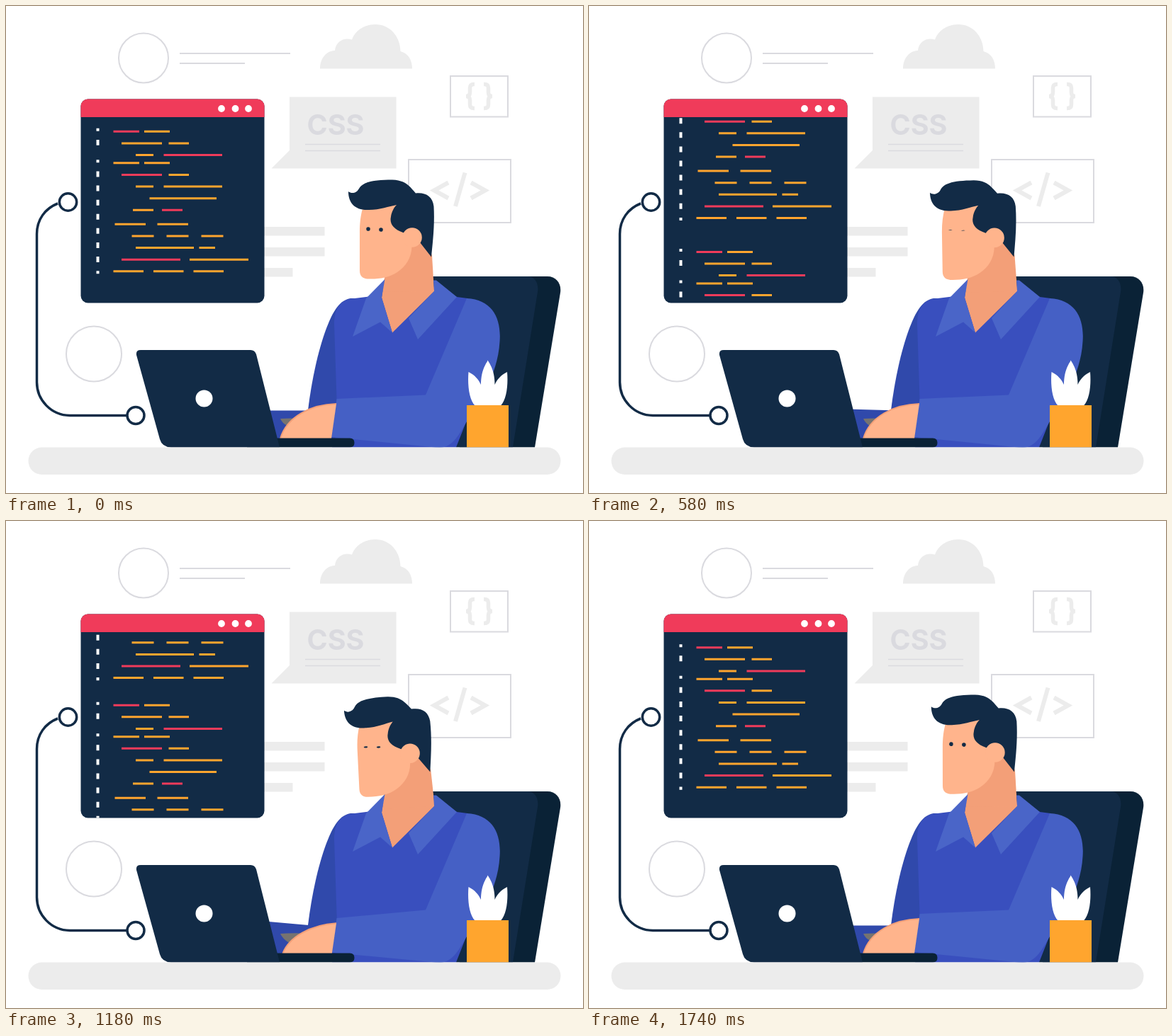
These frames come from a looping animation (814x688 px, 1.76 s). An HTML page:

```html
<!DOCTYPE html>
<html lang="en">
<head>
<meta charset="utf-8">
<title>Developer at work</title>
<style>
html, body { margin: 0; width: 100%; height: 100%; overflow: hidden; background: #fff; }
svg { display: block; }
.navy { fill: #122b46; }
.deep { fill: #0a2236; }
.pale { fill: #ececec; }
.skin { fill: #ffb48c; }
.shade { fill: #f39f78; }
.sleeve { fill: #4560c5; }
.collar { fill: #4a65c8; }
.far { fill: #3049ab; }
.thin { fill: none; stroke: #dadadf; stroke-width: 2; }
.glyph { fill: none; stroke: #ececec; stroke-width: 6; }
.cable { fill: none; stroke: #122b46; stroke-width: 3.5; }
</style>
</head>
<body>
<svg width="814" height="688" viewBox="0 0 814 688">
  <defs>
    <clipPath id="screen"><rect x="105.5" y="157" width="259" height="262.5"/></clipPath>
    <clipPath id="bar"><rect x="105" y="131" width="260" height="26"/></clipPath>
  </defs>

  <!-- backdrop -->
  <g class="thin">
    <circle cx="194" cy="73.5" r="35"/>
    <circle cx="124" cy="491.5" r="39"/>
    <path d="M245 67H401M245 81H337"/>
    <rect x="627" y="99" width="81" height="57.5"/>
    <rect x="568" y="217" width="144" height="89"/>
  </g>
  <path class="pale" d="M443 88.500C443 73 453 63 464 63C465 50 477 44 488 47.500C493 34 506 26 521 26C541 26 556 42 556.500 64C568 67 573 77 573 88.500Z"/>
  <path class="pale" d="M400 128.500H550.500V229.500H374.500L400 204Z"/>
  <text x="424.500" y="182" font-family="Inter, sans-serif" font-weight="700" font-size="39.500" fill="#dadadf">CSS</text>
  <path class="thin" style="stroke-width:1.5" d="M422 195.500H528M422 204.500H528"/>
  <path class="pale" d="M360 312H449.500V324.500H360ZM360 341H449.500V353.500H360ZM360 370H404.500V382.500H360Z"/>
  <g class="glyph">
    <path id="brace" stroke-width="5.500" d="M661 110.500H660Q654.500 110.500 654.500 116V122Q654.500 127.500 649 127.500Q654.500 127.500 654.500 133V139Q654.500 144.500 660 144.500H661"/>
    <use href="#brace" transform="translate(1335) scale(-1 1)"/>
    <path id="angle" d="M624 249.500L604 260.500L624 271.500"/>
    <use href="#angle" transform="translate(1280) scale(-1 1)"/>
    <path d="M647.500 235.500L634 283"/>
  </g>

  <!-- cable -->
  <g class="cable">
    <circle cx="87.500" cy="277" r="12.200"/>
    <circle cx="183" cy="578.500" r="12"/>
    <path d="M73 279C55 286 43.500 302 43.500 322V531A47 47 0 0 0 90 578.500H171"/>
  </g>

  <!-- code window -->
  <rect class="navy" x="105.500" y="131.500" width="259" height="288" rx="10"/>
  <rect fill="#f03b5a" x="105.500" y="131.500" width="259" height="60" rx="10" clip-path="url(#bar)"/>
  <path stroke="#fff" stroke-width="9.800" stroke-linecap="round" d="M304 145h0M323.500 145h0M342 145h0"/>
  <g clip-path="url(#screen)" fill="none" stroke-width="3">
    <g id="code"></g>
    <use id="codeAgain" href="#code"/>
  </g>

  <!-- chair -->
  <path class="deep" d="M590 382H764C776 382 784 392 782 405L746 623.500H640Z"/>
  <path class="navy" d="M590 382H736C746 382 752 392 750 404L715 623.500H635Z"/>

  <!-- body -->
  <path id="farArm" class="far"/>
  <path id="farHand" fill="#767370"/>
  <path class="far" d="M486 413C468 416 459 437 451 458C440 488 431 530 426 571L440 600H500V413Z"/>
  <path fill="#394fbe" d="M484 414C466 419 463 436 463 450L468 600L460 623.500H635L660 560L651 413L636 411L600 395L534 400L516 410Z"/>
  <path class="shade" d="M534 384L530 412L545 461.500L604 403L603 390Z"/>
  <g id="head">
    <path class="shade" d="M575 320L590 328L601 352L604 403L532 404L535 375Z"/>
    <path class="skin" d="M504 283C500 296 499 308 499 320V374C499 382 504 385.500 511 385.500C526 386 540 384 552 376C564 368 572 356 572.500 340L580 300L550 275Z"/>
    <path class="navy" d="M483 262C488 266 495 264 498 258C503 248 520 245.500 545 245.500C563 246 569 254 578 264.500C592 263 602 269 603.500 283C605 310 602 334 600 354.500L584 334L573 325L560 320C546 315 541 307 543 298C544 290 548 284 551 281C540 283 528 288 512 288C492 289 483 278 483 262Z"/>
    <circle class="skin" cx="573" cy="327" r="13.800"/>
    <ellipse class="navy eye" cx="511" cy="315" rx="2.800"/>
    <ellipse class="navy eye" cx="529" cy="316" rx="2.800"/>
  </g>
  <path class="collar" d="M534.500 386L508 413L489 467L528 446.500L545 461.500L530 412Z"/>
  <path class="collar" d="M603 387.500H607L636 411L581 471L568 441L604 403Z"/>
  <path id="sleeve" class="sleeve"/>
  <path id="hand" class="skin"/>
  <path id="handEdge" fill="none" stroke="#f39f78" stroke-width="2"/>

  <!-- laptop -->
  <path class="deep" d="M340 610.500H485Q491.500 610.500 491.500 617T485 623.500H340Z"/>
  <path class="navy" d="M190 486H345Q351 486 353 492L386 623.500H233Q220 623 217 612L184 493Q183 486 190 486Z"/>
  <circle cx="279.500" cy="554.500" r="12" fill="#fff"/>

  <!-- plant and desk -->
  <g fill="#fff">
    <path id="leaf" d="M680 500.500C674 509 670 520 670 535C667 528 661 521 652.500 517C651 535 653 556 662 565H680Z"/>
    <use href="#leaf" transform="translate(1359.500) scale(-1 1)"/>
  </g>
  <rect x="650" y="564" width="59" height="59.500" fill="#ffa52e"/>
  <rect class="pale" x="31.500" y="623.500" width="751" height="38.500" rx="19.200"/>
</svg>
<script>
const LOOP = 1760, PITCH = 16.6;
const $ = id => document.getElementById(id);
const set = (id, name, value) => $(id).setAttribute(name, value);

// A code line: its indent, the gap between words, then the word lengths.
const line = (x, gap, ...words) => ({ x, gap, words });

// Draws lines from y downwards; the words counted in `reds` are red.
function block(y, lines, ...reds) {
  let count = 0;
  return lines.map(({ x, gap, words }, i) => words.map(length => {
    const color = reds.includes(count++) ? '#f03b5a' : '#ffa52e';
    const dash = `<path stroke="${color}" d="M${x} ${y + i * PITCH}h${length}"/>`;
    x += length + gap;
    return dash;
  }).join('')).join('');
}

const opening = [line(151.5, 7, 36.5, 36), line(163, 9.5, 57, 28.5), line(183, 14.5, 25, 82.5)];
const middle = [line(202.5, 0, 94.5), line(179, 12, 29, 29)];
const ending = [
  line(153.5, 16.5, 43.5, 43.5),
  line(177.5, 18, 31, 31, 31),
  line(183, 7.5, 82, 22.5),
  line(163, 13, 83, 83),
  line(151.5, 14, 42.5, 42.5, 42.5)
];
$('code').innerHTML =
  block(177.5, opening, 0, 5) +
  block(222, [...opening, ...middle], 2, 8) +
  block(308.5, ending, 7) +
  `<path stroke="#fff" stroke-width="4" stroke-dasharray="8 12.1" stroke-dashoffset="4"
    d="M129.5 173v24M129.5 217.5v161"/>`;

// Rises from 0 at a to 1 at the peak, and falls back to 0 at b.
const tent = (t, a, peak, b) => Math.max(0, Math.min((t - a) / (peak - a), (b - t) / (b - peak)));
const smooth = u => u * u * (3 - 2 * u);
const eyes = document.querySelectorAll('.eye');

function draw(t) {
  // The repeat starts a little lower and runs a little faster.
  const scroll = -.1298 * t;
  set('code', 'transform', `translate(0 ${scroll})`);
  set('codeAgain', 'transform', `translate(0 ${254.4 - .1454 * t - scroll})`);

  const nod = Math.max(tent(t, 0, 240, 680), tent(t, 485, 930, LOOP));
  const blink = Math.max(tent(t, 510, 580, 650), tent(t, 1130, 1210, 1290));
  set('head', 'transform', `rotate(${-4.1 * nod} 597 387)`);
  for (const eye of eyes) eye.setAttribute('ry', 2.8 * (1 - .9 * blink));

  const lift = Math.max(.45 * tent(t, 0, 240, 600), tent(t, 500, 920, 1580));
  set('farArm', 'd', `M365 ${571.5 - 10 * lift}L427 ${571.5 - lift}L470 571V612H365Z`);
  set('farHand', 'd', `M387 583Q400 582 420 ${583 - lift}L${397 + 4 * lift} ${593 + 5 * lift}Q390 590 387 583Z`);

  const dip = Math.max(.45 * tent(t, 0, 240, 560), smooth(tent(t, 600, 1020, 1660)));
  const wrist = 459 + dip;
  set('sleeve', 'd', `M650 413C686 415 699 441 696.5 474C694 520 668 560 650 587C640 604 630 624 612 624Q606 624 600 623L${wrist} ${609 + dip}L466.5 ${555 + 7 * dip}L592 549.5Z`);
  const top = `M${387 + 4 * dip} 611C${396 + 4 * dip} ${580 + 9 * dip} 430 ${563 + 9 * dip} 466 ${562 + 7.5 * dip}`;
  set('hand', 'd', `${top}L${wrist} 611Z`);
  set('handEdge', 'd', top);
}

const start = performance.now();
function frame(now) {
  draw(Math.max(0, now - start) % LOOP);
  requestAnimationFrame(frame);
}
draw(0);
requestAnimationFrame(frame);
</script>
</body>
</html>
```
